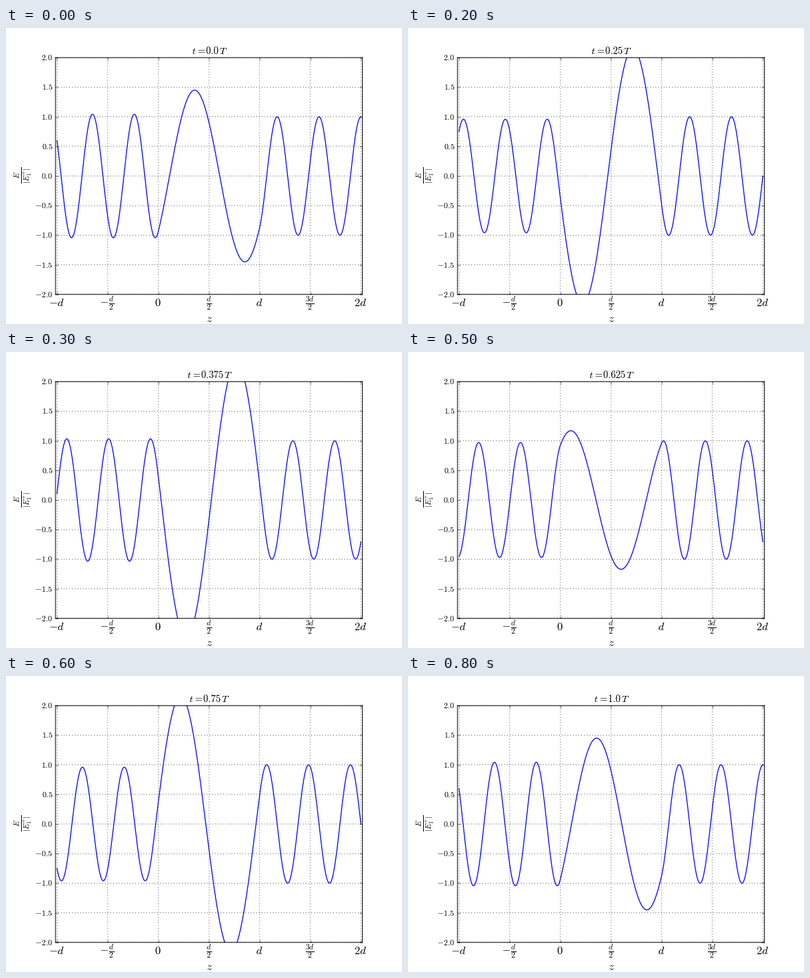
Write a matplotlib script that moves like this. It is 576 px wide and 432 px high and loops after 900 ms.

```python
import numpy as np
import matplotlib.pyplot as plt
from matplotlib.animation import FuncAnimation

W, H, DPI = 576, 432, 72
FRAMES, INTERVAL = 9, 100
RATIO = 2.4                # outer index over slab index
K1 = 2 * np.pi * 2.42      # outer wave number, in units of 1/d
K2 = K1 / RATIO

plt.rcParams.update({
    "mathtext.fontset": "cm",
    "lines.scale_dashes": False,
    "axes.axisbelow": False,
    "axes.linewidth": 1.0,
    "path.snap": False,
})


def field(z):
    """Complex field of a wave crossing a slab at 0 < z < d, with d = 1."""
    a = np.exp(-1j * K1)

    def slab(s):
        u = K2 * (s - 1)
        return a * (np.cos(u) + 1j * RATIO * np.sin(u))

    slope = a * (np.sin(K2) / RATIO + 1j * np.cos(K2))
    left = slab(0) * np.cos(K1 * z) + slope * np.sin(K1 * z)
    right = np.exp(1j * K1 * (z - 2))
    return np.where(z < 0, left, np.where(z < 1, slab(z), right))


fig = plt.figure(figsize=(W / DPI, H / DPI), dpi=DPI, facecolor="white")
ax = fig.add_axes([0.125, 0.1, 0.775, 0.8])
ax.set_xlim(-1.015, 2.015)
ax.set_ylim(-2, 2)
xticks = np.arange(-1, 2.1, 0.5)
yticks = np.arange(-2, 2.1, 0.5)
ax.set_xticks(xticks)
ax.set_yticks(yticks)
ax.tick_params(direction="in", length=4, width=0.5, top=True, right=True,
               labelbottom=False, labelleft=False)
ax.grid(True, color="black", linewidth=0.6, linestyle=(0, (1, 3)))


def label(x, y, text, size, ha="center", va="baseline", **kw):
    """Place text at a pixel position counted from the top left."""
    return fig.text(x / W, 1 - y / H, f"${text}$", fontsize=size,
                    ha=ha, va=va, color="black", **kw)


def to_px(x, y):
    px, py = ax.transData.transform((x, y))
    return px, H - py


names = ["-d", r"-\hspace{0.08}\frac{d}{2}", "0", r"\hspace{0.08}\frac{d}{2}",
         "d", r"\hspace{0.08}\frac{3d}{2}", "2d"]
for x, name in zip(xticks, names):
    label(to_px(x, 0)[0] - 0.7, 406, name, 16.4)
for y in yticks:
    label(68, to_px(0, y)[1] + 4, f"{y:.1f}", 11.8, ha="right")

label(295.7, 429, "z", 16.4)
label(25.2, 215, r"\frac{E}{|E_{1}^{+}|}", 16, va="center", rotation=90)
title = label(296, 38, "t", 14.4)

z = np.linspace(-1, 2, 1501)
wave = field(z)
line, = ax.plot(z, wave.real, color="#0000ff", linewidth=1.25)


def draw(i):
    t = i / (FRAMES - 1)
    line.set_ydata((wave * np.exp(-2j * np.pi * t)).real)
    title.set_text(rf"$t\hspace{{0.06}}=\!\mathbf{{{t}}}\hspace{{0.14}}T$")
    return line, title


anim = FuncAnimation(fig, draw, frames=FRAMES, interval=INTERVAL,
                     init_func=lambda: draw(0), repeat=True, repeat_delay=0)
plt.show()
```
